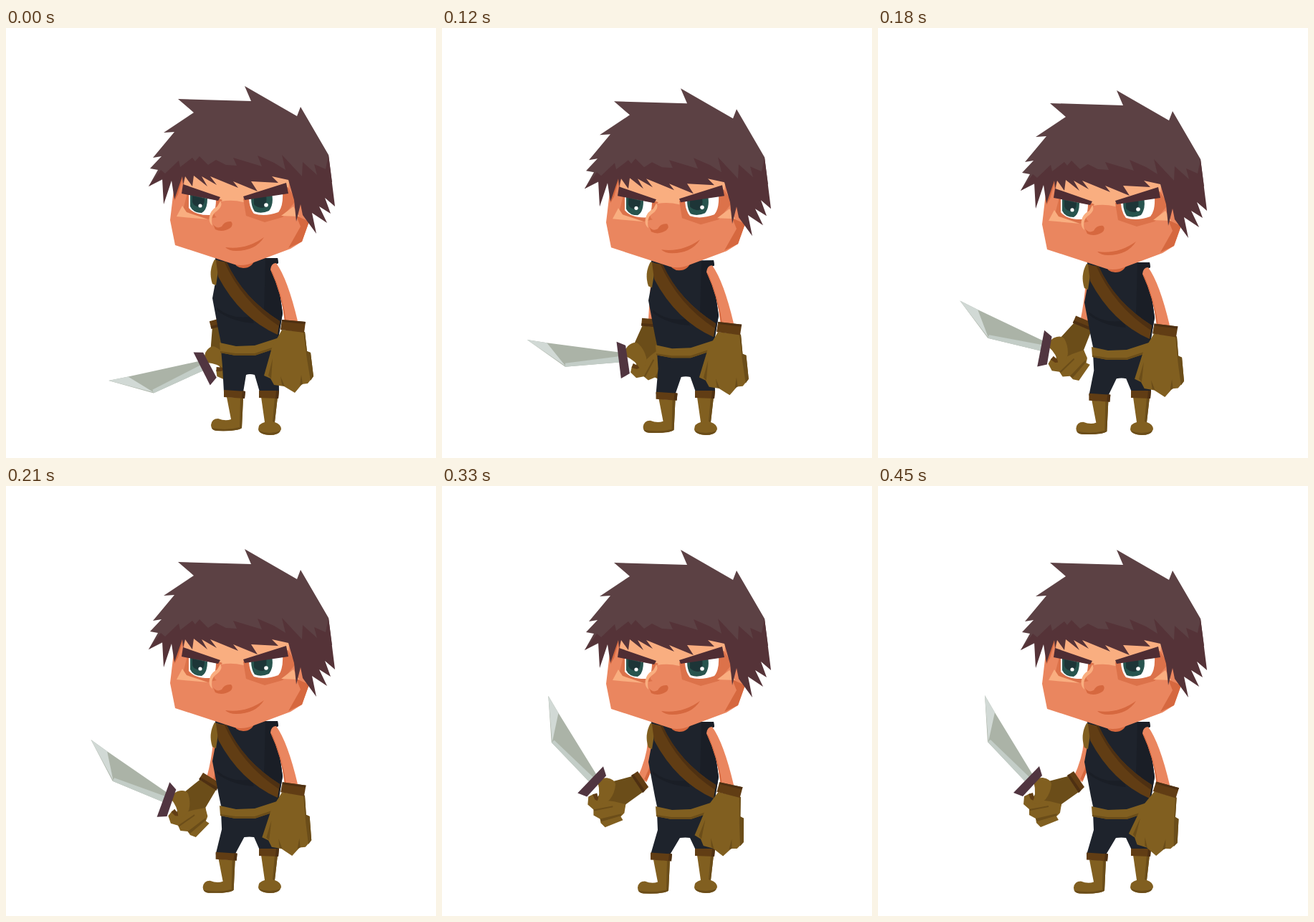
An HTML page for the animation above (8 s loop, 600 by 600 pixels).

```html
<!DOCTYPE html>
<html lang="en">
<head>
<meta charset="utf-8">
<title>Swordsman</title>
<style>
  html, body { margin: 0; width: 100%; height: 100%; overflow: hidden; background: #fff; }
  svg { display: block; width: 100vw; height: 100vh; }
  .skin { fill: #ea865f; } .shade { fill: #d6683f; } .socket { fill: #dc724a; } .peach { fill: #f9ae80; }
  .hair { fill: #5c4144; } .fringe { fill: #553338; } .brow { fill: #4f2d33; }
  .cloth { fill: #1e232c; } .cloth-dark { fill: #1a1e26; }
  .leather { fill: #815f20; } .leather-dark { fill: #6b4d19; } .strap { fill: #613d14; } .strap-dark { fill: #4e3012; }
  .steel { fill: #abb3a7; } .gleam { fill: #d1d9d5; } .edge { fill: #c3cdc7; } .guard { fill: #513540; }
  .iris { fill: #27544e; } .pupil { fill: #1d3537; } .white { fill: #fff; }
</style>
</head>
<body>
<svg viewBox="0 0 600 600">
  <path id="upperArm" fill="none" stroke="#ea865f" stroke-width="14"/>
  <path id="armShade" fill="none" stroke="#d6683f" stroke-width="4"/>

  <g id="swordArm">
    <path class="steel" d="M149 292L163 316L216 403L205 412L153 357Z"/>
    <path class="edge" d="M153 357L157 354L211 406L205 412Z"/>
    <path class="gleam" d="M149 292L163 316L154 357Z"/>
    <path class="leather-dark" d="M265 405L280 427L256 444L252 458L236 460L212 438L238 412Z"/>
    <path class="leather" d="M204 433L212 429L218 437L240 440L256 444L254 456L249 461L252 466L227 476L221 470L220 464L211 459L211 451L203 444Z"/>
    <path class="leather-dark" d="M220 464L250 457L249 460L222 468ZM211 451L238 446L238 448L212 453Z"/>
    <path class="strap" d="M210 430L216 428L219 440L213 437Z"/>
    <path class="leather" d="M217 412Q221 407 230 407Q241 409 242 416Q241 428 234 437Q227 445 215 442Q222 430 217 412Z"/>
    <path class="guard" d="M225 391L229 404L202 433L189 428Z"/>
    <path class="strap" d="M264 404L273 398L288 420L280 428Z"/>
    <path class="strap-dark" d="M264 404L267 402L283 425L280 428Z"/>
  </g>

  <path id="pants" class="cloth"/>

  <g id="leftBoot">
    <path class="leather" d="M308 515L331 516L329 558Q324 563 294 562Q286 561 286 554Q287 545 296 545Q306 549 314 546Z"/>
    <path class="leather-dark" d="M327 516L331 516L329 558Q324 563 294 562Q288 561 287 558Q308 562 326 557Z"/>
    <path class="strap" d="M304 505L334 507L333 517L304 515Z"/>
    <path class="strap-dark" d="M330 506L334 507L333 517L329 516Z"/>
  </g>
  <path class="leather" d="M356 515L379 515L375 550Q384 553 384 560Q381 568 368 568Q353 567 352 560Q352 552 361 550Z"/>
  <path class="leather-dark" d="M375 515L379 515L375 550L372 549ZM353 562Q368 568 383 562Q380 568 368 568Q355 567 353 562Z"/>
  <path class="strap" d="M353 506L381 506L380 517L353 516Z"/>
  <path class="strap-dark" d="M377 506L381 506L380 517L376 517Z"/>

  <g id="body">
    <path class="cloth" d="M292 321L379 321L380 328L370 333L382 370L386 398L380 434L346 446L301 444L297 425L288 377L293 350Z"/>
    <path class="cloth-dark" d="M362 322L379 321L380 328L370 333L382 370L386 398L380 432L360 398ZM294 390Q315 408 343 402L346 412Q315 410 294 394Z"/>
    <path class="shade" d="M316 323L348 321Q344 335 331 335Q320 335 316 323Z"/>
    <path class="leather" d="M291 323L297 325L296 340L293 359L288 357Q282 339 291 323Z"/>
    <path class="strap" d="M293 324L308 327Q331 377 382 409L379 428Q327 405 296 347Z"/>
    <path class="strap-dark" d="M304 325L308 327Q331 377 382 409L381 416Q329 382 304 325Z"/>
    <path class="leather" d="M298 439L321 444L347 443L381 432L380 446L347 457L320 457L299 453Z"/>
    <path class="leather-dark" d="M299 451L320 454L347 454L380 443L380 446L347 457L320 457L299 453Z"/>
    <path class="skin" d="M369 337Q370 328 377 328Q393 350 407 409L389 409Q385 371 369 337Z"/>
    <path class="shade" d="M369 337L372 341Q386 374 391 409L389 409Q385 371 369 337Z"/>

    <g id="glove">
      <path class="leather" d="M385 421L417 424L420 451L425 453L429 486L421 496L413 497L403 509L388 500L374 498L369 489L360 485L371 446Z"/>
      <path class="leather-dark" d="M415 424L417 424L420 451L425 453L429 486L425 492L420 462ZM366 485L372 461L370 489ZM385 498L383 486L389 500ZM410 499L412 484L414 497Z"/>
      <path class="strap" d="M385 407L418 410L416 425L383 421Z"/>
      <path class="strap-dark" d="M385 407L418 410L417 413L385 410Z"/>
    </g>

    <path class="skin" d="M237 200L229 268L236 303L319 330Q332 333 346 327L397 308L413 298L423 270L402 200Z"/>
    <path class="shade" d="M394 307L413 298L423 270L405 262L411 277ZM235 208L247 207L240 232L235 241Z"/>
    <path class="peach" d="M250 204L396 204L394 225L331 243Q315 239 300 242L248 224Z"/>
    <path class="socket" d="M291 236L302 240Q284 258 294 264L281 267L246 258L253 230ZM331 238L393 222L405 240L386 264L361 271L335 262Z"/>
    <path class="peach" d="M246 248L252 257L282 267L238 263ZM384 262L401 249L409 263Z"/>
    <path class="white" d="M255 232L293 240Q293 256 286 261Q264 262 255 251ZM339 239L386 230Q387 249 380 257Q361 264 346 259Q340 252 339 239Z"/>
    <path class="iris" d="M257 232L281 238Q281 254 273 258Q261 258 257 249ZM342 237L371 231Q374 246 367 255Q356 260 347 256Q342 249 342 237Z"/>
    <path class="pupil" d="M260 234L277 238Q277 248 271 250Q262 249 260 243ZM346 237L363 233Q365 247 359 251Q350 251 346 246Z"/>
    <circle class="white" cx="271" cy="248" r="2.6"/>
    <circle class="white" cx="363" cy="247" r="2.8"/>
    <path class="brow" d="M247 218L299 236L296 241L245 231ZM331 235L391 216L394 231L333 240Z"/>
    <path class="peach" d="M299 241Q304 249 292 257Q285 263 288 276Q281 270 285 259Q288 252 295 249Z"/>
    <path class="shade" d="M289 274Q294 281 301 277Q305 269 314 270Q318 274 313 279Q302 286 292 281Z"/>
    <path class="shade" d="M306 306Q335 310 360 292Q348 311 321 311Q311 311 306 306Z"/>

    <path class="hair" d="M240 99L342 102L333 81L406 123L411 110L450 177L455 215L420 215L385 200L240 207L219 211L199 221L212 198L201 196L217 179L205 181L235 145L220 146L262 118Z"/>
    <path class="fringe" d="M199 221L216 198L222 203L241 185L243 194L260 181L264 186L270 179L282 191L293 184L307 191L322 192L317 181L357 193L351 178L374 188L390 198L385 177L413 207L414 187L434 205L430 190L446 197L450 177L459 249L445 237L453 259L437 249L448 272L427 258L433 287L414 261L411 246L405 270L402 240L394 212L371 207L380 216L342 214L351 228L317 214L324 223L285 207L294 219L273 207L281 221L262 206L260 221L250 207L247 219L246 207L235 239L231 213L220 246L218 210Z"/>
  </g>
</svg>
<script>
const LOOP = 8000, STEP = 30, MOVE_END = 450;
const part = id => document.getElementById(id);
const mix = (a, b, p) => a + (b - a) * p;
const smooth = x => { x = Math.min(1, Math.max(0, x)); return x * x * (3 - 2 * x); };
const place = (id, transform) => part(id).setAttribute('transform', transform);
const trace = (id, d) => part(id).setAttribute('d', d);

function draw(time) {
  const t = Math.min(MOVE_END, Math.floor(time / STEP) * STEP);
  const sink = smooth(t / 270);
  const swing = smooth(t / 345);
  const follow = 0.16 * smooth(t / 200) + 0.84 * smooth((t - 150) / 290);
  const drop = 8 * sink;
  const footX = -13 * sink, footY = 6.5 * sink;

  place('body', `translate(0 ${drop})`);
  place('leftBoot', `translate(${footX} ${footY})`);
  place('glove', `translate(${2 * follow} 0) rotate(${10 * follow} 400 412)`);

  // The forearm, fist and sword turn together around the cuff.
  const cuffX = mix(298, 276, swing), cuffY = mix(411, 412, swing);
  place('swordArm', `translate(${cuffX - 276} ${cuffY - 412}) rotate(${-71 * (1 - swing)} 276 412)`);
  const bendX = mix(300, 294, swing);
  trace('upperArm', `M${bendX} ${350 + drop}Q${bendX - 2} 382 ${cuffX + 3} ${cuffY - 2}`);
  trace('armShade', `M${bendX + 5} ${350 + drop}Q${bendX + 3} 384 ${cuffX + 8} ${cuffY - 2}`);

  trace('pants', `M300 ${448 + drop}L380 ${440 + drop}L381 508L354 508
    L${347 - sink} ${484 + 7 * sink}Q340 ${482 + drop} ${335 - 3 * sink} ${484 + 7 * sink}
    L${331 + footX} ${508 + footY}L${304 + footX} ${508 + footY}L${302 - sink} ${472 + drop}Z`);
}

function tick() {
  draw(performance.now() % LOOP);
  requestAnimationFrame(tick);
}
tick();
</script>
</body>
</html>
```
